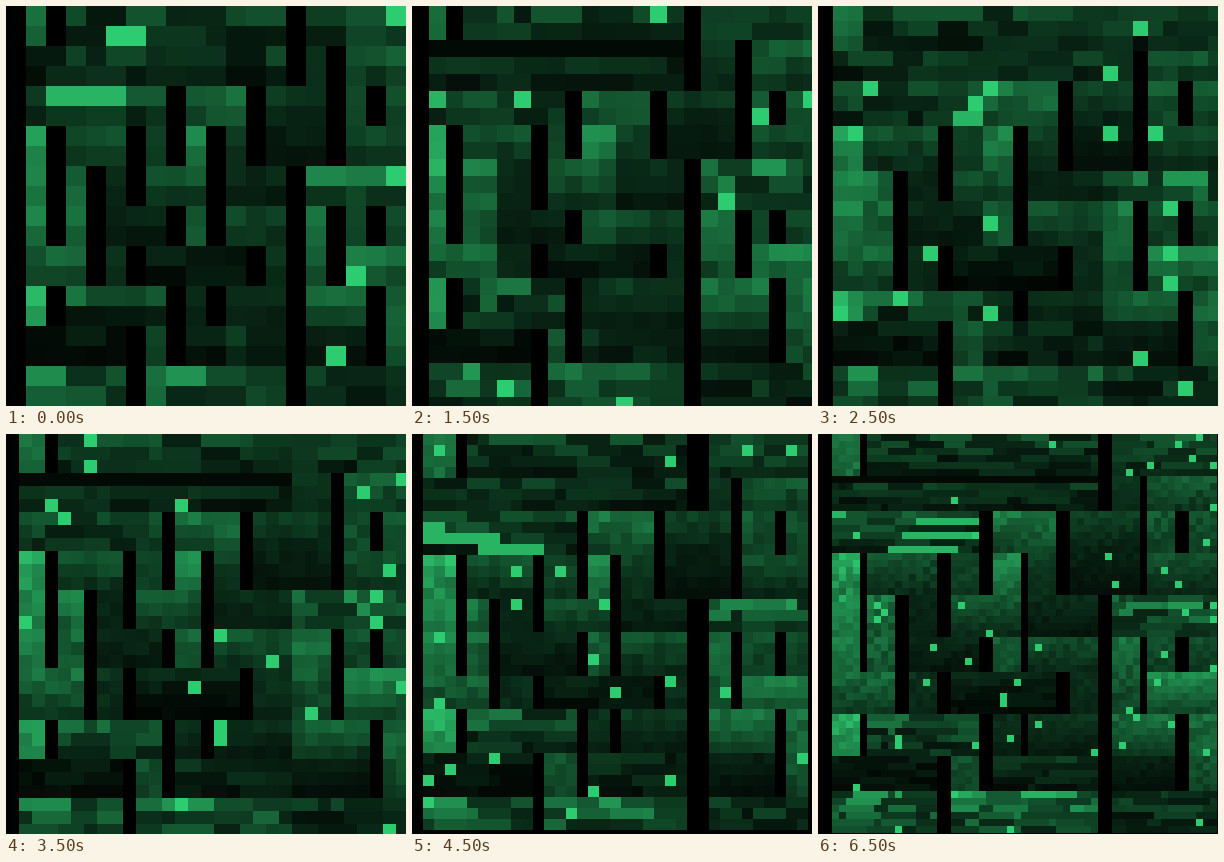
Write an HTML page with a canvas that moves like this. It is 400 px wide and 400 px high and loops after 7 s.

```html
<!DOCTYPE html>
<html lang="en">
<head>
<meta charset="utf-8">
<title>Refining mosaic</title>
<style>
  html, body { margin: 0; width: 100%; height: 100%; overflow: hidden; background: #000; }
  canvas { display: block; width: 400px; height: 400px; }
</style>
</head>
<body>
<canvas id="stage" width="400" height="400"></canvas>
<script>
const STAGE = 400, TILE = 40, GAP = 12;
const STEP = 500, LOOP = 7000, COARSEST = 20;
const ctx = document.getElementById("stage").getContext("2d");

// Corridors of the maze, row by row: [width in tiles, brightness in percent]
const rows = [
  [[1, 60], [6, 27], [3, 33]],
  [[7, 25], [1, 25], [2, 42]],
  [[4, 30], [2, 55], [2, 28], [1, 38], [1, 35]],
  [[1, 78], [2, 38], [1, 32], [1, 58], [1, 28], [2, 15], [2, 35]],
  [[1, 68], [1, 52], [1, 18], [2, 42], [2, 20], [3, 50]],
  [[1, 58], [1, 45], [2, 18], [1, 42], [2, 36], [1, 50], [1, 35], [1, 35]],
  [[2, 48], [1, 22], [3, 13], [1, 22], [1, 38], [2, 60]],
  [[1, 75], [3, 38], [1, 20], [2, 24], [2, 48], [1, 52]],
  [[3, 12], [1, 38], [3, 20], [2, 15], [1, 38]],
  [[3, 50], [4, 50], [3, 25]]
];

function hash(a, b) {
  const s = Math.sin(a * 127.1 + b * 311.7) * 43758.5453;
  return s - Math.floor(s);
}

function corridorAt(x, row) {
  const column = Math.ceil(x / TILE) - 1;
  let start = 0;
  for (const [width, level] of rows[row]) {
    if (column < start + width) return { start, width, level: level / 100 };
    start += width;
  }
}

// Thin bright bands that slope gently across the long bar
function onBand(x, y) {
  const period = TILE / 3;
  const phase = (y - 80 + 0.045 * x - 11.9 + 2 * period) % period;
  return phase < 3.1;
}

function brightness(x, y) {
  const row = Math.floor(y / TILE);
  const { start, width, level } = corridorAt(x, row);
  if (x - start * TILE < GAP) return 0;

  const depth = y / TILE - row;
  if (row === 2 && start === 0 && onBand(x, y)) return 0.88;
  if (width === 7 && depth < 0.22) return 0.05;
  if (hash(x, y) > 0.98) return 1;

  const wide = width > 2;
  const band = Math.floor((y + x * (wide ? 0.05 : 0.6)) / 4.5);
  const patch = wide ? Math.floor(x / 36 + hash(band, 3)) : start;
  const grain = (hash(band, patch + 17) - 0.5) * (wide ? 1.2 : 0.4);
  const fade = 1.1 - depth * (width === 1 ? 0.3 : 0.6);
  return Math.min(1, level * fade * (1 + grain));
}

function draw(size) {
  const count = Math.round(STAGE / size);
  ctx.fillStyle = "#000";
  ctx.fillRect(0, 0, STAGE, STAGE);
  for (let j = 0; j < count; j++) {
    for (let i = 0; i < count; i++) {
      const x = Math.min((i + 0.5) * size, STAGE - 0.5);
      const y = Math.min((j + 0.5) * size, STAGE - 0.5);
      const v = brightness(x, y);
      ctx.fillStyle = `rgb(${Math.round(46 * v)},${Math.round(204 * v)},${Math.round(113 * v)})`;
      ctx.fillRect(i * size, j * size, size, size);
    }
  }
}

const begin = performance.now();
let shown = 0;

function tick() {
  const time = (performance.now() - begin) % LOOP;
  const size = COARSEST - Math.floor(time / STEP);
  if (size !== shown) draw(shown = size);
  requestAnimationFrame(tick);
}
tick();
</script>
</body>
</html>
```
